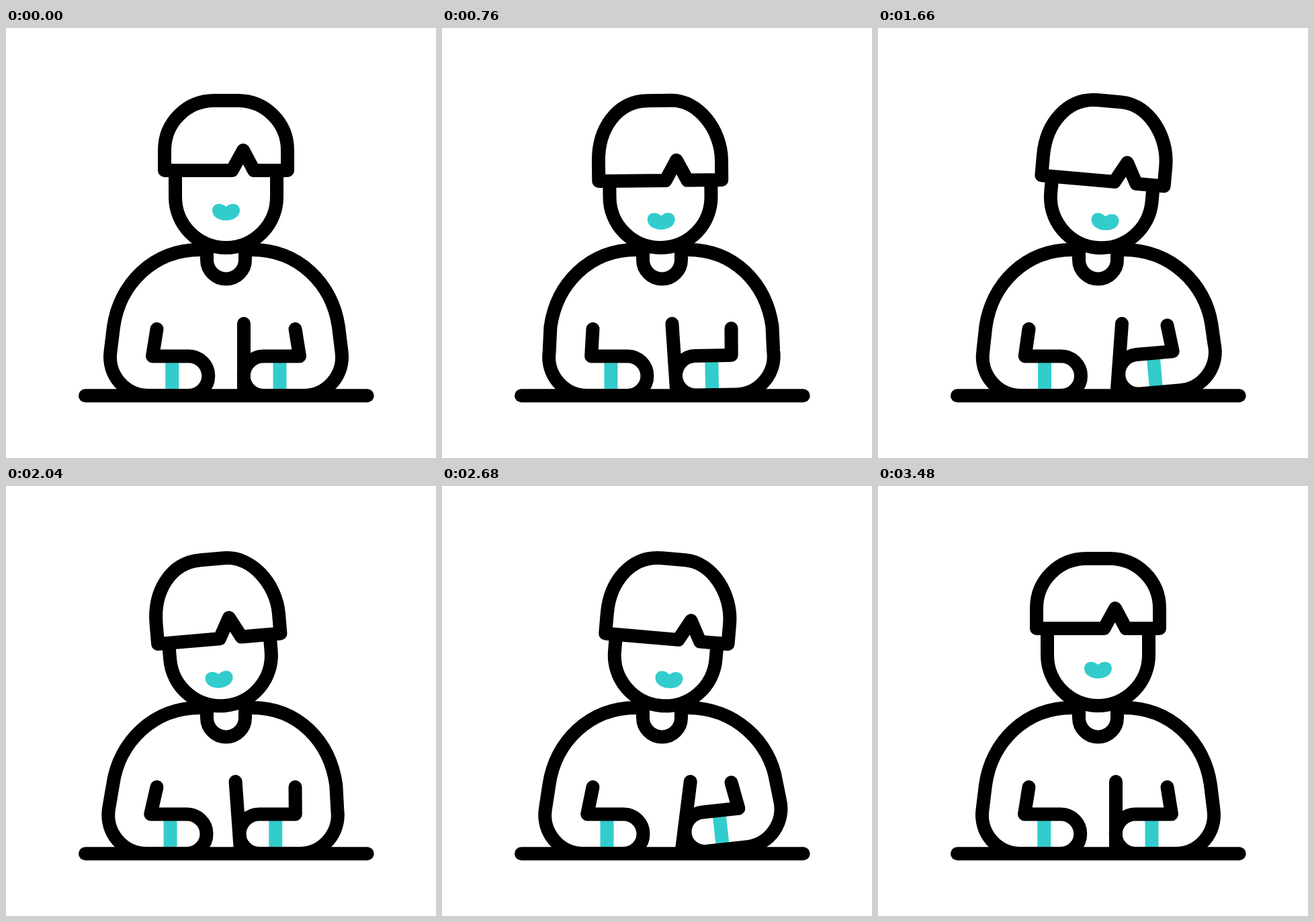
Animation of 640 by 640 pixels, one loop 3600 ms. Source, as an HTML page with a canvas:

```html
<!DOCTYPE html>
<html lang="en">
<head>
<meta charset="utf-8">
<style>
html, body { margin: 0; width: 100%; height: 100%; overflow: hidden; background: #fff; }
canvas { display: block; }
</style>
</head>
<body>
<canvas width="640" height="640"></canvas>
<script>
const ctx = document.querySelector('canvas').getContext('2d');
const LOOP = 3600, START = 120, CYCLE = 1120, TEAL = '#33cccc';

// Eased value at time t; keys are [time, value] pairs in order.
function track(t, ...keys) {
  let [t0, v0] = keys[0];
  for (const [t1, v1] of keys) {
    if (t < t1) {
      const k = Math.max(0, (t - t0) / (t1 - t0));
      return v0 + (v1 - v0) * k * k * (3 - 2 * k);
    }
    [t0, v0] = [t1, v1];
  }
  return v0;
}

// Phase within three repeated swings; 0 while at rest.
function phase(t, length) {
  const n = (t - START) / length;
  return n < 0 || n >= 3 ? 0 : n % 1;
}

function stroke(d, { fill, color = '#000', cap = 'round' } = {}) {
  const path = new Path2D(d);
  if (fill) {
    ctx.fillStyle = fill;
    ctx.fill(path);
  }
  ctx.strokeStyle = color;
  ctx.lineCap = cap;
  ctx.stroke(path);
}

const cuff = (from, to) => stroke(`M${from} L${to}`, { color: TEAL, cap: 'butt' });

function drawLeftArm(q) {
  const shoulder = 160 + q * 0.35;
  cuff([247.3 + q, 489], [247.3 + q, 545]);
  stroke(`M299 330 H289 C219 330 ${shoulder + 9} 381 ${shoulder} 445 L${155.5 + q} 482
    C${151 + q} 516 ${177 + q} 547 ${212 + q} 547 H${272 + q}
    a29.2 29.2 0 0 0 0 -58.5 H${218 + q} L224.5 448`);
}

function drawRightArm(pen, lift) {
  const a = lift * Math.PI / 180, cos = Math.cos(a), sin = Math.sin(a);
  const at = (x, y) => {
    const dx = x - 354, dy = y - 517;
    return [354 + pen / 2 + dx * cos - dy * sin, 517 + dx * sin + dy * cos];
  };
  const shoulder = 495 + pen * (pen > 0 ? 0.15 : 0.3);
  const tip = 354 + pen * (pen > 0 ? 0.2 : 0.42);
  cuff(at(407.5, 489), at(407.5, 545));
  stroke(`M${354 + pen} 440 L${tip} 540`);
  stroke(`M356 330 H366 C436 330 ${shoulder - 9} 381 ${shoulder} ${445 + lift * 0.8}
    L${at(499.5, 482)} C${at(504, 516)} ${at(478, 547)} ${at(443, 547)} L${at(383, 547)}
    A29.2 29.2 0 0 1 ${at(383, 488.5)} L${at(437, 488.5)} L430.5 ${448 + lift * 1.1}`);
}

function drawHead(tilt, nod) {
  const drop = 15 * nod, notch = 1.7 * tilt, base = 212 + drop, side = 182 + drop;
  ctx.save();
  ctx.translate(327.5 - 1.7 * nod, 327);
  ctx.rotate(tilt * Math.PI / 180);
  ctx.translate(-327.5, -327);
  stroke('M252 212 V251.5 a75.5 75.5 0 0 0 151 0 V212', { fill: '#fff', cap: 'butt' });
  stroke(`M236 ${base} V${side} C236 ${141 + drop * 0.55} ${269 - 5 * nod} 108 310 108 H345
    C386 108 419 ${141 + drop * 0.8} 419 ${side} V${base} H${369 + notch}
    L${353 + notch} ${side} L${336.5 + notch} ${base} Z`, { fill: '#fff' });
  ctx.translate(1.4 * tilt + 1.7 * nod, 13.5 * nod);
  ctx.fillStyle = TEAL;
  ctx.fill(new Path2D(`M307 271.5 C307 262 318 258 327.5 266 C337 258 348 262 348 271.5
    C348 281 338 286.5 327.5 286.5 S307 281 307 271.5 Z`));
  ctx.restore();
}

function draw(now) {
  const t = now % LOOP;
  const head = phase(t, 1113), arm = phase(t, CYCLE);
  const tilt = track(head, [0, 0], [0.35, 5.2], [0.77, -5.2], [1, 0]);
  const nod = track(t, [START, 0], [520, 1], [3080, 1], [3480, 0]);
  const pen = track(arm, [0, 0], [0.25, 16.5], [0.64, -14], [1, 0]);
  const lift = track(arm, [0, 0], [0.25, -6.3], [0.68, 0]);
  const slide = track(t, [START, 0], [1080, 5.6], [2150, -3], [3360, 0]);

  ctx.clearRect(0, 0, 640, 640);
  ctx.lineWidth = 20;
  ctx.lineJoin = 'round';
  drawLeftArm(slide);
  drawRightArm(pen, lift);
  stroke('M299 330 V345 a28.5 28.5 0 0 0 57 0 V330');
  stroke('M118 547.3 H537.7');
  drawHead(tilt, nod);
}

const begin = performance.now();
function tick() {
  draw(performance.now() - begin);
  requestAnimationFrame(tick);
}
tick();
</script>
</body>
</html>
```
